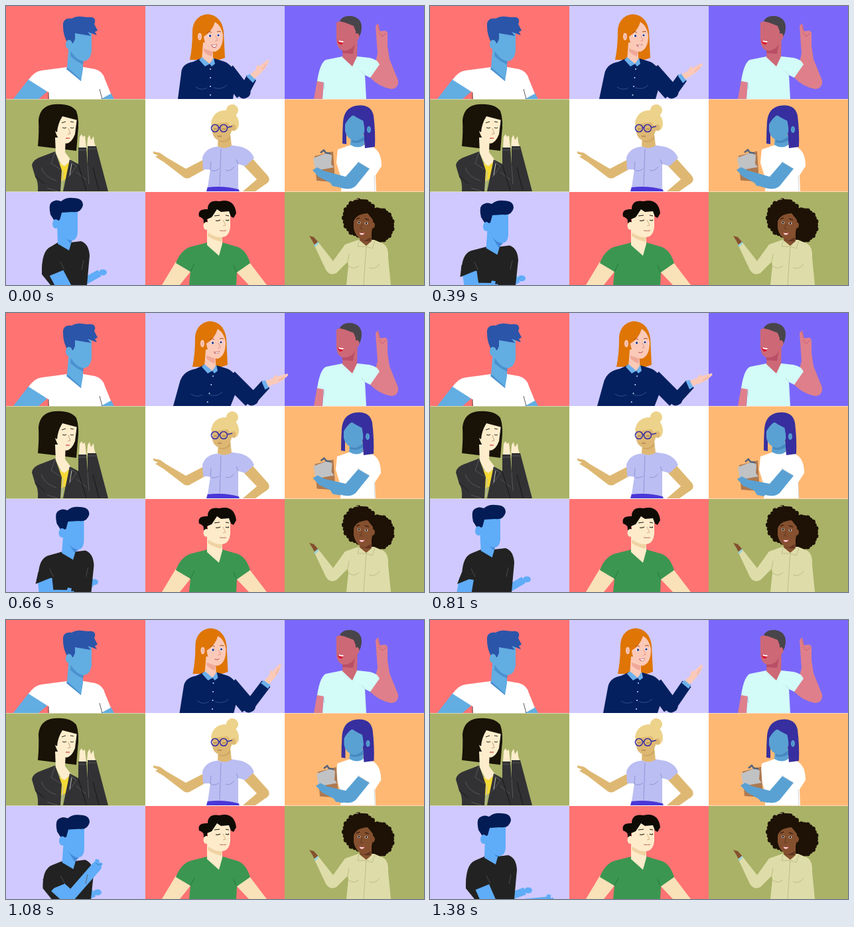
Write an HTML page with a canvas that moves like this. It is 630 px wide and 420 px high and loops after 1410 ms.

```html
<!DOCTYPE html>
<html lang="en">
<meta charset="utf-8">
<title>Nine people talking</title>
<style>
html, body { margin: 0; width: 630px; height: 420px; overflow: hidden }
canvas { display: block }
</style>
<canvas width="630" height="420"></canvas>
<script>
const ctx = document.querySelector('canvas').getContext('2d');
const LOOP = 1410, STEP = 30;
const KEYS = [0, 270, 510, 810, 960, 1200, 1380];

// Pose rows follow KEYS.
const redhead = [ // head dx, hem dx, elbow x, wrist x, wrist y, hand angle, mouth opening
  [0, 0, 362, 370, 108, -.78, 1], [0, -1, 362, 370, 108, -.78, .1],
  [4, -7, 374, 391, 108, -.4, .6], [4, -7, 374, 392, 107, -.41, .2],
  [3, 0, 372, 398, 97, -.81, .1], [6, 5, 367, 386, 95, -1.02, .3],
  [6, 2, 367, 387, 96, -.87, .7]];
const speaker = [ // head dx, dy, left, right, top, near arm: sleeve x, elbow, hand; far hand
  [0, 0, 54, 126, 354, 75, 90, 428, 128, 440, 144, 402],
  [-1, 2, 46, 128, 360, 57, 54, 430, 60, 440, 154, 412],
  [21, 6, 49, 138, 361, 62, 72, 418, 129, 409, 118, 410],
  [-2, 0, 48, 127, 354, 55, 50, 430, 60, 440, 144, 402],
  [-1, 2, 51, 128, 360, 71, 90, 418, 134, 375, 154, 412],
  [21, 7, 60, 136, 362, 80, 101, 418, 139, 367, 118, 410],
  [6, 2, 54, 131, 354, 78, 92, 432, 178, 424, 146, 408]];
const clipboard = [ // head dx, board dx, board dy
  [0, 0, 0], [0, 0, -1], [0, 0, 0], [-4, 1, 3], [-3, 4, 3], [0, 6, 2], [0, 6, 2]];

function pose(rows, t) {
  let i = 0;
  while (i < KEYS.length - 2 && t >= KEYS[i + 1]) i++;
  const k = Math.min(1, (t - KEYS[i]) / (KEYS[i + 1] - KEYS[i]));
  return rows[i].map((v, j) => v + (rows[i + 1][j] - v) * k);
}
function fill(color, d) {
  ctx.fillStyle = color;
  ctx.fill(new Path2D(d));
}
function line(color, width, d) {
  ctx.strokeStyle = color;
  ctx.lineWidth = width;
  ctx.stroke(new Path2D(d));
}
function oval(color, x, y, rx, ry = rx) {
  ctx.fillStyle = color;
  ctx.beginPath();
  ctx.ellipse(x, y, rx, ry, 0, 0, 7);
  ctx.fill();
}
function at(x, y, draw, angle = 0) {
  ctx.save();
  ctx.translate(x, y);
  ctx.rotate(angle);
  draw();
  ctx.restore();
}
function row(n, ...people) {
  ctx.save();
  ctx.beginPath();
  ctx.rect(0, n * 140, 630, 140);
  ctx.clip();
  people.forEach(draw => draw());
  ctx.restore();
}

function quiffMan() {
  const skin = '#62ade2';
  fill(skin, 'M11 140L35 109L62 129L49 140ZM142 140L158 131L163 140Z');
  fill('#fff', 'M54 97L92 92H117L134 95Q146 98 149 110L158 132L143 140H65L64 130L34 111Q43 98 54 97Z');
  fill(skin, 'M95 55L92 93L113 113L116 95V80Z');
  fill('#4b90cf', 'M98 68Q105 80 117 83L116 88Q103 82 97 75ZM92 92L113 111V113L91 95Z');
  fill(skin, 'M98 38H129V68Q127 82 117 83Q104 81 98 66Z');
  fill('#2b55a9', 'M86 31C85 20 92 18 99 19C108 13 118 17 124 17C134 15 136 22 133 27L138 37L134 39L137 44L123 39L128 45L104 41V50L101 56L93 56Q86 44 86 31Z');
  oval(skin, 95, 58, 5, 7);
  line('#333', .8, 'M64 140V130M141 125L145 140');
}

function redheadWoman(t) {
  const [dx, hem, elbow, wx, wy, angle, mouth] = pose(redhead, t);
  const navy = '#04205f', skin = '#fbc9b8', hair = '#df7505';
  at(dx, 0, () => {
    fill(hair, 'M277 81Q281 62 281 38C282 5 324 3 328 38L330 78Q318 83 308 81Z');
    fill(skin, 'M297 55H312V80L307 90L295 82Z');
  });
  fill(navy, `M${259 + hem} 140L${264 + (hem + dx) / 2} 102Q${264 + dx} 87 ${282 + dx} 84L${295 + dx} 78L${306 + dx} 88L${314 + dx} 79L${330 + dx} 84Q${342 + dx} 89 ${347 + dx} 108L${342 + hem / 2} 140Z`);
  line(navy, 25, `M${332 + dx} 97L${elbow - 4} 131`);
  ctx.lineCap = 'round';
  line(navy, 17, `M${elbow - 4} 131L${elbow - 2} 130`);
  ctx.lineCap = 'butt';
  line(navy, 16, `M${elbow - 4} 131L${wx} ${wy}`);
  at(wx, wy, () => {
    fill('#6cb0ec', 'M-4 -7L2 -6L3 6L-4 7Z');
    fill(skin, 'M2 -5L13 -4L18 -7L21 -7L20 -4L37 -2L36 1L27 4L17 5L2 4Z');
    line('#d98f82', .6, 'M20 3L30 1');
  }, angle);
  at(dx, 0, () => {
    fill('#6cb0ec', 'M295 77L307 87L300 91L291 81ZM307 87L313 78L315 87L310 91Z');
    fill('#f0a899', 'M298 64L312 69L310 76Q302 73 298 68Z');
    fill(skin, 'M298 46Q311 38 315 24Q325 30 327 44Q327 66 314 69Q300 64 298 46Z');
    oval(skin, 292, 46, 3, 5.500);
    line('#db8376', .7, 'M291 44Q295 45 291 49M316 45L319 52L315 53');
    oval('#fff', 307, 45, 2.6, 2);
    oval('#fff', 320, 44, 2.3, 2);
    oval('#17338c', 307.5, 45, 1.7);
    oval('#17338c', 320, 44, 1.6);
    line('#a34c18', 1, 'M303 40Q307 37 310 40M318 39Q321 37 324 39');
    if (mouth > .3) {
      fill('#b84a50', `M309 58Q314 60 318 57Q318 ${60 + 3 * mouth} 313 ${60 + 3 * mouth}Q310 62 309 58Z`);
      fill('#fff', `M309.500 59Q314 60 317.500 58Q317 ${60 + 2 * mouth} 313 ${60 + 2 * mouth}Z`);
    } else line('#b84a50', 1, `M310 59Q314 ${57 + mouth * 22} 317 58`);
  });
  line('#41609f', .7, `M${286 + hem} 122Q${295 + hem} 128 ${303 + hem} 123M${313 + hem} 123Q${325 + hem} 127 ${333 + hem} 119`);
  for (let i = 0; i < 4; i++) oval('#cce0ff', 308 + dx + (hem - dx) * i / 4, 95 + i * 13, 1);
}

function pinkMan() {
  const skin = '#df7f8b', face = '#cd6876';
  fill(skin, 'M464 140L469 112L479 115L477 140ZM548 107L555 92L560 72L558 44L557 30L561 26L564 38L572 37L575 40L575 60L578 80L591 112Q592 124 581 125Q562 122 548 107Z');
  fill('#d3fbf8', 'M482 81L507 76H530L548 78Q559 80 563 88L549 108L541 104L543 140H477L479 115L469 113Q473 86 482 81Z');
  fill(face, 'M509 55L507 77L522 91L529 76L530 42Z');
  fill('#b94f66', 'M507 67Q520 68 526 55L523 72L507 71Z');
  fill(face, 'M498 25Q512 17 529 28L528 48Q525 68 508 67Q498 65 498 48Z');
  fill('#48454a', 'M503 23Q507 14 520 15Q535 17 536 31Q536 42 531 48L527 48V38L524 30L511 25Z');
  oval(face, 529, 46, 3.5, 5);
  fill('#d81831', 'M500 52L509 53Q508 58 504 58Q500 57 500 52Z');
  fill('#fff', 'M501 52L509 53L508 55L502 54Z');
  line('#bb5870', .8, 'M562 40L567 46L573 41M563 38L560 28');
  line('#9fd8dc', .8, 'M479 115L480 125M541 104L536 98');
}

function jacketWoman() {
  const skin = '#fdedcc', black = '#323235', hair = '#181207';
  fill(hair, 'M49 172Q51 150 73 148Q97 146 106 158Q111 171 108 194L106 218L48 211Q50 190 49 172Z');
  fill(skin, 'M74 198H90L89 220L98 232L86 244L75 222Z');
  fill('#f4d936', 'M78 235L88 241L98 233L100 256L83 264Z');
  fill(skin, 'M74 188Q76 171 84 164L107 169L104 193Q99 206 91 207Q79 205 74 188Z');
  fill(hair, 'M72 187Q69 163 83 159L106 167L108 172L85 166Q78 177 77 190Z');
  line('#28221c', 1, 'M84 176L90 174M97 174L102 175M85 183Q88 185 91 183M97 183Q100 185 102 183');
  line('#b98d66', .8, 'M94 184L97 192L93 193');
  line('#d35550', 1.4, 'M90 199L96 199');
  fill(skin, 'M110 214L111 197L114 193L116 197L119 195L121 214ZM122 214L123 199L126 194L128 202L132 196L133 205L136 214Z');
  fill(black, 'M39 240Q40 231 53 227L74 219L84 247L82 279H48Q49 264 44 257ZM96 231L109 238V213H121L123 240V211H136L145 245L154 279H86Z');
  line('#5b5b5b', .9, 'M74 220L68 237L84 247M95 233L106 241L94 258M53 243Q58 258 76 263M62 274L78 279M109 217H121M123 215H136M123 240L125 268M106 250L121 262');
  line('#bcbcbc', 1, 'M99 237L96 255M86 249L84 277');
  line('#151515', .9, 'M44 256L58 268M109 239L121 278M131 243L140 278');
}

function blondeWoman() {
  const skin = '#deb873', hair = '#ecd28a';
  fill(skin, 'M304 228L271 245L242 228L232 221L222 219V222L229 225L225 227L238 235L268 258Q273 261 278 258L305 243ZM370 228L395 256Q400 264 390 269L376 279H357L378 261L358 240Z');
  fill('#4a36d8', 'M302 279L304 272Q328 269 350 275L352 279Z');
  fill('#bbbef2', 'M296 228Q301 214 316 212L336 209L355 212Q370 217 374 229L361 241L350 238L350 276Q328 270 304 273L308 246L297 246Z');
  oval(hair, 341, 157, 9);
  fill(hair, 'M309 176Q312 158 330 157Q350 159 351 177Q351 187 343 188L310 180Z');
  fill(skin, 'M320 193H338L340 210Q330 217 319 211Z');
  fill('#cda763', 'M322 201Q331 203 338 192L338 200Q329 208 321 204Z');
  fill(skin, 'M311 175L334 173L342 182L338 194Q334 204 324 203Q312 201 311 189Z');
  oval(skin, 343, 183, 3.500, 5);
  fill(hair, 'M310 178L316 166L341 173L339 183L334 175Z');
  line('#3930a2', 1.6, 'M309.500 184a5.500 5.500 0 1 0 11 0a5.500 5.500 0 1 0 -11 0M322.500 184a5.500 5.500 0 1 0 11 0a5.500 5.500 0 1 0 -11 0M320 183H323M333 183L341 181');
  line('#855b35', .8, 'M313 185H318M326 185H331M319 196H325');
  line('#8588cd', .8, 'M324 215L322 271M307 246Q314 251 321 245M331 247Q338 250 344 242M350 238L347 231M308 246L309 234');
}

function clipboardWoman(t) {
  const [dx, bx, by] = pose(clipboard, t);
  const skin = '#5aa1d3', hair = '#372f9f';
  at(dx / 2, 0, () => {
    fill('#fff', 'M500 216L520 209H540L554 213Q566 220 566 241L557 255L558 279H505L506 262L498 236Z');
    at(dx / 2, 0, () => {
      fill(hair, 'M508 174Q510 153 528 150Q550 147 554 165Q557 190 556 212L541 214L538 180L513 186V208L507 207Q507 190 508 174Z');
      fill(skin, 'M520 195H540V209Q531 216 519 209Z');
      fill('#4788c0', 'M521 201Q532 204 540 196V202Q531 208 521 205Z');
      fill(skin, 'M511 172Q522 160 537 167L541 184Q539 203 526 203Q513 200 511 188Z');
      fill(hair, 'M510 180Q511 156 530 155Q545 159 548 181L541 192L539 173Q528 168 523 164Q515 170 510 180Z');
      oval(skin, 547, 186, 3, 5);
      line('#3577ae', .8, 'M546 183Q549 186 546 189');
    });
  });
  at(bx, by, () => {
    fill('#ad7950', 'M465 226L493 219L496 265L468 263Z');
    fill('#c1c2c4', 'M463 229L484 221L491 225L490 238L494 243L466 248Z');
    line('#53637a', 2.5, 'M474 221L479 217L482 221L489 222');
    fill(skin, 'M488 265L496 261L505 266L503 273L492 271Z');
  });
  fill(skin, `M531 235L548 245L527 271Q518 279 500 272L${471 + bx} ${257 + by}L${462 + bx} ${247 + by}L${469 + bx} ${243 + by}L${479 + bx} ${248 + by}L512 257Z`);
  line('#c2cbd2', .8, 'M530 234L548 245M555 255L556 279');
}

function speakerMan(t) {
  const [hx, hy, left, right, top, sx, ex, ey, ax, ay, bx, by] = pose(speaker, t);
  const skin = '#5facf8', hair = '#031c55', mid = 88 + hx * .65;
  line(skin, 11, `M${right - 12} 417L${bx - 3} ${by}`);
  oval(skin, bx + 2, by - 1, 6, 4.5);
  fill('#222', `M${left} 404Q${left - 1} ${top + 14} ${left + 14} ${top + 8}L${mid - 10} ${top + 2}H${mid + 9}L${right - 13} ${top}Q${right - 1} ${top + 4} ${right} ${top + 22}L${right - 4} 420H${left + 13}Z`);
  fill(skin, `M${77 + hx} ${327 + hy}L${mid - 10} ${top + 4}L${mid + 7} ${top + 14}L${mid + 11} ${top}L${99 + hx} ${344 + hy}Z`);
  fill('#418ad8', `M${82 + hx} ${341 + hy}Q${89 + hx} ${352 + hy} ${100 + hx} ${353 + hy}L${mid + 9} ${top + 3}Z`);
  at(hx, hy, () => {
    fill(skin, 'M79 309H108V338Q108 354 97 353Q84 349 79 333Z');
    fill(hair, 'M67 314Q64 300 68 296Q75 290 83 294Q90 288 101 289Q116 289 116 300Q113 312 100 310L84 311L81 322L74 325Z');
    oval(skin, 75, 328, 5, 7);
  });
  ctx.lineJoin = 'round';
  line(skin, 22, `M${sx} 400L${ex} ${ey}`);
  line(skin, 15, `M${sx} 402L${ex} ${ey}L${ax} ${ay}`);
  ctx.lineJoin = 'miter';
  at(ax, ay, () => {
    oval(skin, 0, 0, 7.5);
    line(skin, 4, 'M-3 -1L0 -9L4 -8M3 0L8 -5');
    line('#3472b8', .8, 'M-1 -5L3 -2L7 -4');
  });
  fill('#222', `M${left} 390L${sx - 14} 408L${sx + 13} 397L${sx + 9} 387Z`);
  line('#555', .8, `M${sx + 13} 397L${sx + 7} 385M${right - 12} 397L${right - 9} 383`);
}

function greenShirtMan() {
  const skin = '#f9e1b8', face = '#fdebca';
  fill(skin, 'M256 385L278 400L262 420H235ZM347 400L367 386L393 420H366Z');
  fill('#3b9651', 'M256 387Q264 366 280 362L304 356H326L350 363Q362 368 368 387L348 401L347 420H276L278 400Z');
  fill(face, 'M303 326H326V358L321 376L303 360Z');
  fill('#f0d3a3', 'M305 341Q315 349 326 348L325 355Q311 352 304 346Z');
  fill(face, 'M304 314L318 304L338 309V333Q336 348 325 348Q309 346 304 333Z');
  fill('#0e0b05', 'M291 317Q288 305 304 306Q304 291 322 294Q344 289 347 312L343 319L339 317L336 309L324 310L318 306L310 318L303 321L304 328L298 327Q299 319 291 317Z');
  oval(face, 302, 331, 4.500, 6);
  line('#241c13', 1.1, 'M314 316L322 315M331 315L336 316M316 323Q320 324 323 322M331 322Q334 324 336 322');
  line('#c79d70', .8, 'M327 322L331 330L327 331');
  line('#be6756', 1, 'M322 338Q328 339 332 338');
  line('#21743a', .9, 'M278 400L284 388M347 400L343 390');
}

function afroWoman() {
  const skin = '#85502f', hair = '#1d1205', shirt = '#dedda9';
  const curls = (x, y, rx, ry) => {
    oval(hair, x, y, rx, ry);
    for (let i = 0; i < 26; i++) {
      const a = i * Math.PI / 13;
      oval(hair, x + rx * Math.cos(a), y + ry * Math.sin(a), 3 + i % 2);
    }
  };
  curls(534, 319, 24, 26);
  curls(562, 330, 20, 23);
  ctx.setLineDash([4, 3]);
  line('#d0c28d', 1, 'M521 294Q535 287 552 293');
  ctx.setLineDash([]);
  fill(skin, 'M457 346L464 348L471 356L466 362L462 354Z');
  fill(shirt, 'M465 361L471 356L493 384L511 359L531 352H555L569 358Q577 363 576 379L580 420H513L516 391L515 385L498 402Q488 407 482 397Z');
  fill('#9bd1d0', 'M464 360L470 355L472 357L466 363Z');
  fill(skin, 'M534 340H551V354L543 361L533 353Z');
  fill('#5d3621', 'M535 348Q542 354 550 348L549 354Q540 355 535 352Z');
  fill(skin, 'M524 324Q528 313 545 312L553 322Q553 352 539 353Q527 349 524 335Z');
  oval(skin, 552, 330, 4, 5);
  oval('#fff', 532, 326, 2.2, 1.8);
  oval('#fff', 543, 327, 2.4, 1.8);
  oval('#1a100b', 532, 326, 1.4);
  oval('#1a100b', 543, 327, 1.4);
  line('#24140c', 1.2, 'M528 321L533 319M541 320L547 322');
  line('#5b321d', .8, 'M537 328L534 335L538 336');
  fill('#fff', 'M532 341Q537 343 541 341Q539 345 536 345Q533 344 532 341Z');
  line('#b24d48', 1, 'M532 341Q537 343 541 341Q539 345 536 345Q533 344 532 341Z');
  line('#b6b57d', .8, 'M543 362L539 420M532 353L530 362L543 362L552 365L556 354M516 391Q524 398 532 391M547 394Q557 398 563 388M515 385L517 373');
}

const cells = ['#ff7373', '#d0c9ff', '#7b68fa', '#a9b267', '#fff', '#ffb873', '#d0c9ff', '#ff7373', '#a9b267'];

function frame(now) {
  const t = Math.floor(now % LOOP / STEP) * STEP;
  cells.forEach((color, i) => {
    ctx.fillStyle = color;
    ctx.fillRect(i % 3 * 210, Math.floor(i / 3) * 140, 210, 140);
  });
  row(0, quiffMan, pinkMan, () => redheadWoman(t));
  row(1, jacketWoman, blondeWoman, () => clipboardWoman(t));
  row(2, () => speakerMan(t), greenShirtMan, afroWoman);
  line('rgba(255, 255, 255, .5)', 1, 'M0 140.500H630M0 279.500H630');
  requestAnimationFrame(frame);
}
requestAnimationFrame(frame);
</script>
</html>
```
